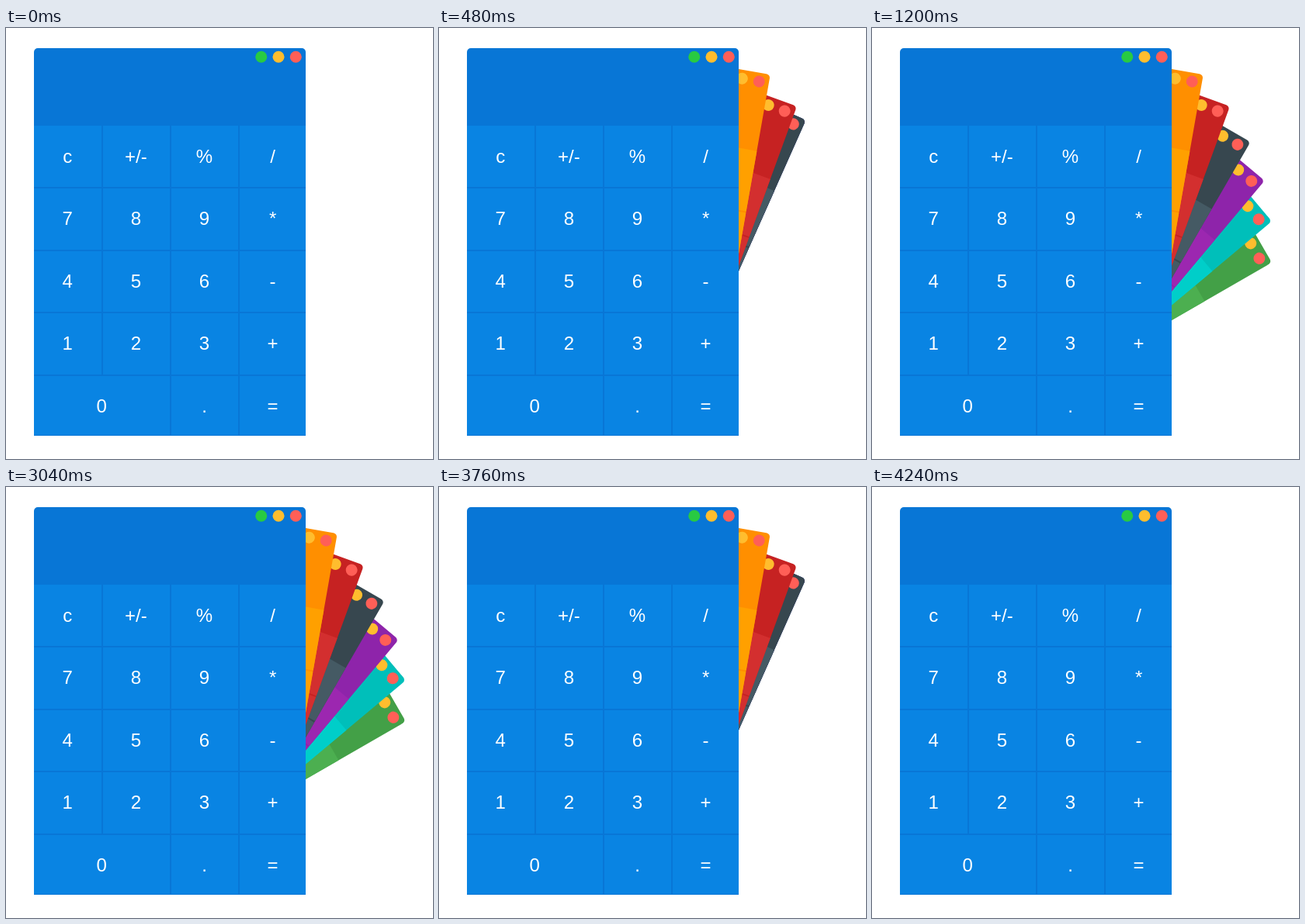
Write an HTML page that moves like this. It is 550 px wide and 556 px high and loops after 4.48 s.

```html
<!DOCTYPE html>
<html lang="en">
<head>
<meta charset="utf-8">
<title>Calculator themes</title>
<style>
  html, body { margin: 0; width: 100%; height: 100%; overflow: hidden; background: #fff; }
  svg { display: block; width: 550px; height: 556px; }
  text { font: 24px "Liberation Sans", Arial, sans-serif; fill: #fff; text-anchor: middle; }
</style>
</head>
<body>
<svg id="stage" viewBox="0 0 550 556">
  <clipPath id="side"><rect x="386" y="0" width="164" height="556"/></clipPath>
  <g id="fan" clip-path="url(#side)"></g>
  <g id="front"></g>
</svg>
<script>
const LOOP = 4480, STEP = 20, MAX_ANGLE = 60, CLOSE_AT = 3040;

// header and line colour, key colour
const FRONT = ['#0876d6', '#0984e3'];
const THEMES = [
  ['#ff8f00', '#ffa000'],
  ['#c62222', '#d32f2f'],
  ['#37474f', '#455a64'],
  ['#8e24aa', '#9c27b0'],
  ['#00bfba', '#00cec9'],
  ['#43a047', '#4caf50'],
];
const KEYS = [
  ['c', '+/-', '%', '/'],
  ['7', '8', '9', '*'],
  ['4', '5', '6', '-'],
  ['1', '2', '3', '+'],
  ['0', null, '.', '='],
];
const LEFT = [36, 125, 213, 301], RIGHT = [123, 211, 299, 386];
const TOP = [126, 207, 288, 368, 449], BOTTOM = [205, 286, 366, 447, 525];
const LIGHTS = [[328.75, '#28ca42'], [351, '#ffbd2e'], [373.25, '#ff5f57']];

function calculator([dark, light]) {
  let out = `<path fill="${dark}" d="M36 526V31a5 5 0 0 1 5-5H381a5 5 0 0 1 5 5V526Z"/>`;
  for (const [x, color] of LIGHTS) {
    out += `<circle cx="${x}" cy="37.25" r="7.5" fill="${color}"/>`;
  }
  KEYS.forEach((row, r) => row.forEach((key, c) => {
    if (key === null) return;
    const wide = key === '0';
    const right = RIGHT[wide ? 1 : c];
    const x = wide ? 123.3 : 79.3 + 88.1 * c;
    const y = Math.round(173.6 + 80.6 * r);
    out += `<rect x="${LEFT[c]}" y="${TOP[r]}" width="${right - LEFT[c]}"
      height="${BOTTOM[r] - TOP[r]}" fill="${light}"/><text x="${x}" y="${y}">${key}</text>`;
  }));
  return out;
}

const fan = document.getElementById('fan');
document.getElementById('front').innerHTML = calculator(FRONT);
// the last theme lies at the bottom of the pile
fan.innerHTML = [...THEMES].reverse().map(t => `<g>${calculator(t)}</g>`).join('');
const cards = [...fan.children].reverse();

// one degree per step, both ways
function angleAt(time) {
  const steps = Math.floor(time / STEP);
  const closing = Math.max(0, steps - CLOSE_AT / STEP);
  return Math.max(0, Math.min(MAX_ANGLE, steps) - closing);
}

const start = performance.now();
function draw() {
  const angle = angleAt((performance.now() - start) % LOOP);
  cards.forEach((card, i) => {
    const turn = Math.min(angle, 10 * (i + 1));
    card.setAttribute('transform', `rotate(${turn} 211 276)`);
  });
  requestAnimationFrame(draw);
}
draw();
</script>
</body>
</html>
```
